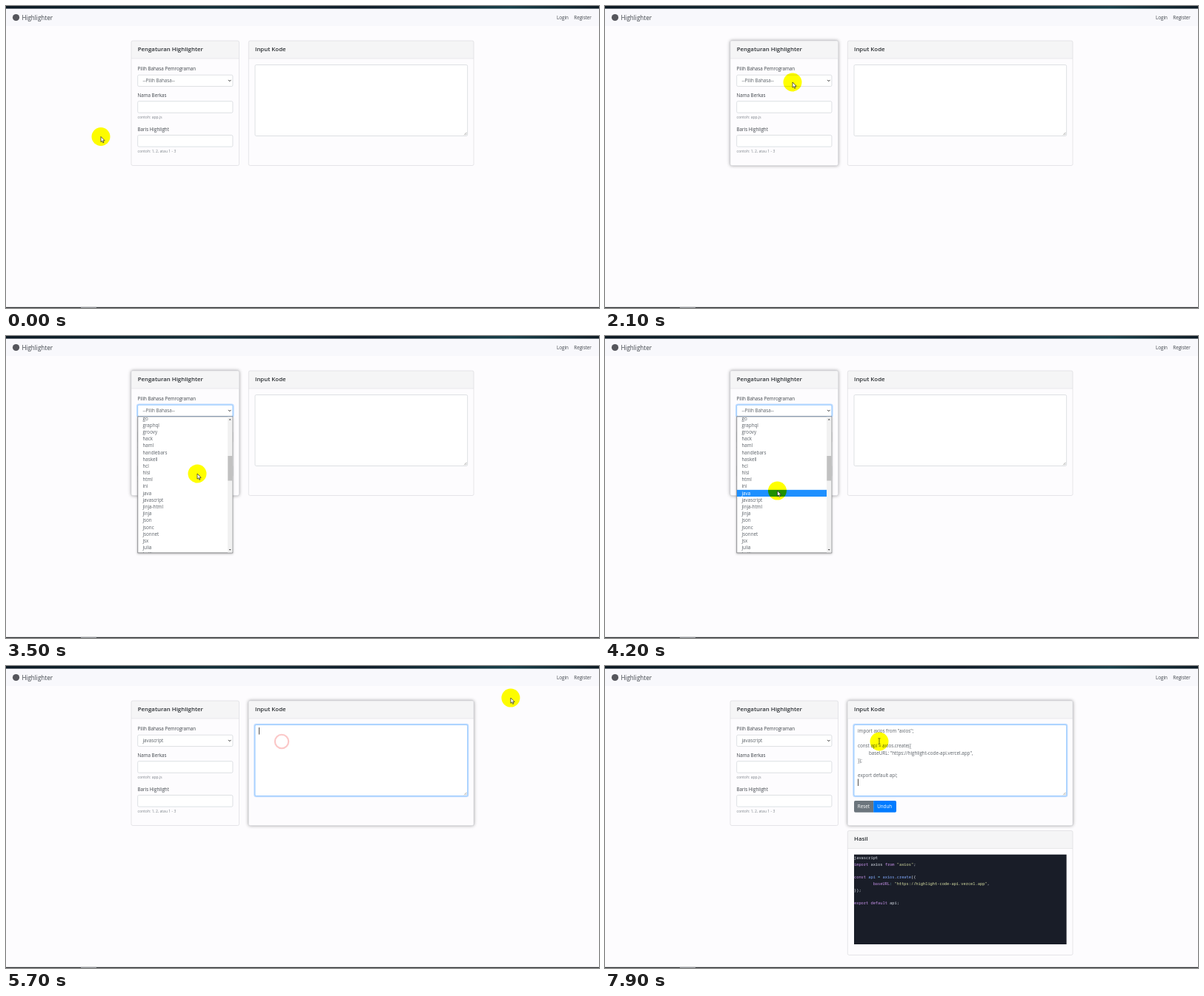
Recreate the animation shown at these times as an HTML page. Size 800 by 408 pixels, loop 8 s.

```html
<!DOCTYPE html>
<html lang="id">
<head>
<meta charset="utf-8">
<title>Highlighter</title>
<style>
  html, body { margin: 0; width: 100%; height: 100%; overflow: hidden; background: #fdfcfe; }
  svg { display: block; width: 100vw; height: 100vh; }
  text { font-family: "Open Sans", "Noto Sans", sans-serif; font-size: 6.25px; fill: #3f444a; white-space: pre; }
  .title { font-size: 7.85px; font-weight: 600; fill: #2b2f33; }
  .brand { font-size: 8.1px; }
  .hint { font-size: 5.05px; fill: #7c838a; }
  .field, .option { fill: #5a6067; }
  .button { fill: #fff; }
  .code { font-family: "Noto Sans Mono", "DejaVu Sans Mono", monospace; font-size: 5.35px; }
  .shadow { fill: #fff; stroke: #c4c4c8; filter: drop-shadow(0 0 2px rgba(0, 0, 0, .35)); }
  .glow { fill: none; stroke: #bfdcff; stroke-width: 2.6; }
  .halo { fill: #ff0; mix-blend-mode: multiply; }
</style>
</head>
<body>
<svg id="stage" viewBox="0 0 800 408"></svg>
<script>
const LOOP = 8000, STEP = 100;
const ROW = 9.18, LIST_TOP = 109, LIST_H = 184, SCROLL = 250;
const LANGS = ("--Pilih Bahasa-- abap actionscript-3 ada apex asm awk bat c clojure cobol coffee cpp " +
  "crystal csharp css d dart diff dockerfile dream-maker elixir elm erb erlang fish fsharp go graphql " +
  "groovy hack haml handlebars haskell hcl hlsl html ini java javascript jinja-html jinja json jsonc " +
  "jsonnet jsx julia kotlin").replace("--Pilih ", "--Pilih_").split(" ").map(s => s.replace("_", " "));

// Pointer stops: time, x, y
const PATH = [
  [0, 128, 176.5], [1400, 128, 176.5], [2100, 253, 103], [2400, 253, 103], [2800, 255, 142],
  [3100, 258, 186], [3500, 258, 186], [3900, 235, 207], [4100, 235, 207], [4500, 219, 220.5],
  [4700, 219, 220.5], [4900, 325, 168.5], [5000, 332, 160], [5300, 372, 102], [5500, 372, 102],
  [5800, 789, 22.5], [5900, 789, 22.5], [6300, 370, 102], [LOOP, 370, 102]
];
const CLICKS = [[1400, 128, 176.5], [2250, 253, 103], [4690, 219, 220.5], [5350, 372, 102]];

const rect = (x, y, w, h, fill, more = "") =>
  `<rect x="${x}" y="${y}" width="${w}" height="${h}" fill="${fill}" ${more}/>`;
const text = (x, y, str, cls = "", more = "") => `<text x="${x}" y="${y}" class="${cls}" ${more}>${str}</text>`;
const box = (x, y, w, h, id = "") =>
  rect(x, y, w, h, "#fff", `rx="1.7" stroke="#d0d4d9" stroke-width=".7" ${id && `id="${id}"`}`);
const glow = (id, x, y, w, h) => `<rect id="${id}" class="glow" x="${x}" y="${y}" width="${w}" height="${h}" rx="2"/>`;

function card(x, y, w, h, title, shadowId) {
  const r = 2, top = 24;
  return (shadowId ? `<rect id="${shadowId}" class="shadow" x="${x}" y="${y}" width="${w}" height="${h}" rx="${r}"/>` : "") +
    rect(x, y, w, h, "#fdfcfe", `rx="${r}"`) +
    `<path d="M${x} ${y + top}V${y + r}q0-${r} ${r}-${r}H${x + w - r}q${r} 0 ${r} ${r}V${y + top}z" fill="#f5f5f6"/>` +
    `<path d="M${x} ${y + top}h${w}" stroke="#dedee1" stroke-width=".6"/>` +
    rect(x, y, w, h, "none", `rx="${r}" stroke="#dcdce0" stroke-width=".7"`) +
    text(x + 8.7, y + 13.6, title, "title");
}

const codeLine = (y, parts) => text(336, y, parts.map(([color, s]) => `<tspan fill="${color}">${s}</tspan>`).join(""), "code");
const PURPLE = "#c792ea", PLAIN = "#dfe4ee", STRING = "#d9e0a3", BLUE = "#82aaff", CYAN = "#89ddff";
const URL_TEXT = '"https://highlight-code-api.vercel.app"';

const pasted = [
  [341, 89.8, 'import axios from "axios";'], [341, 109.8, "const api = axios.create({"],
  [356, 119.8, `baseURL: ${URL_TEXT},`], [341, 129.8, "});"], [341, 149.8, "export default api;"]
];
const result = [
  [261, [[PLAIN, "javascript"]]],
  [269.8, [[PURPLE, "import"], [PLAIN, " axios "], [PURPLE, "from "], [STRING, '"axios"'], [PLAIN, ";"]]],
  [287.3, [[PURPLE, "const "], [BLUE, "api "], [CYAN, "= "], [BLUE, "axios"], [PLAIN, "."], [BLUE, "create"], [PLAIN, "({"]]],
  [296.1, [[PURPLE, "        baseURL"], [CYAN, ": "], [STRING, URL_TEXT], [PLAIN, ","]]],
  [304.8, [[PLAIN, "});"]]],
  [322.3, [[PURPLE, "export default "], [PLAIN, "api;"]]]
];

const stage = document.getElementById("stage");
stage.innerHTML =
  `<defs><clipPath id="listClip">${rect(178, LIST_TOP, 121, LIST_H, "#000")}</clipPath>
   <linearGradient id="sky"><stop stop-color="#0d1a24"/><stop offset=".35" stop-color="#12303a"/>
   <stop offset=".6" stop-color="#0f1d2a"/><stop offset=".85" stop-color="#17404a"/><stop offset="1" stop-color="#0e1c26"/></linearGradient></defs>` +
  rect(0, 0, 800, 408, "#fdfcfe") + rect(0, 3, 800, 24, "#f8f8fc") + rect(0, 0, 800, 3.6, "url(#sky)") +
  rect(0, 406.8, 800, 1.2, "#2a2d31") + rect(101, 406.8, 21, 1.2, "#8b8e92") +
  `<circle cx="13.5" cy="15.5" r="4.6" fill="#55565c"/>` +
  text(21.4, 18.8, "Highlighter", "brand") + text(743, 18, "Login") + text(766.3, 18, "Register") +
  card(169, 47, 145.5, 168.5, "Pengaturan Highlighter", "shadow1") +
  card(327.3, 47, 303.7, 168.5, "Input Kode", "shadow2") +
  text(177.5, 87.2, "Pilih Bahasa Pemrograman") + text(177.5, 122.8, "Nama Berkas") + text(177.5, 168.8, "Baris Highlight") +
  text(177.5, 152, "contoh: app.js", "hint") + text(177.5, 198, "contoh: 1, 2, atau 1 - 3", "hint") +
  glow("selectGlow", 177.3, 92.7, 129, 16.4) + box(177.7, 93.2, 128.2, 15.4, "select") +
  text(184.5, 103.4, "", "field", 'id="choice"') +
  `<path d="M300.1 99.9l1.7 1.8 1.7-1.8" fill="none" stroke="#333" stroke-width="1"/>` +
  box(177.7, 128.7, 128.2, 15.6) + box(177.7, 174.5, 128.2, 15.6) +
  glow("areaGlow", 335.6, 79.1, 287.4, 96.8) + box(336, 79.5, 286.6, 96, "area") +
  `<path d="M618 174.3l3.6-3.6M620 174.3l1.6-1.6" stroke="#777" stroke-width=".6"/>` +
  `<g id="pasted">${pasted.map(p => text(...p, "field")).join("")}</g>` +
  rect(341, 83, .8, 9.5, "#222", 'id="caret"') +
  `<g id="result">` +
    `<path d="M362.2 182h-24.4q-1.8 0-1.8 1.8v12.2q0 1.8 1.8 1.8h24.4z" fill="#6c757d"/>` +
    `<path d="M362.2 182h29q1.8 0 1.8 1.8v12.2q0 1.8-1.8 1.8h-29z" fill="#007bff"/>` +
    text(340.8, 192.2, "Reset", "button") + text(367.2, 192.2, "Unduh", "button") +
    card(327.3, 222.5, 303.7, 168, "Hasil") + rect(336, 254.7, 286.6, 121.3, "#191d28") +
    `<g id="code">${result.map(l => codeLine(...l)).join("")}</g></g>` +
  `<g id="list">` +
    rect(177.8, 108.9, 128, 184, "#fff", 'stroke="#77797c" stroke-width=".8" style="filter:drop-shadow(0 1px 1.5px rgba(0,0,0,.3))"') +
    `<g clip-path="url(#listClip)"><g id="rows">` + rect(178, 0, 121, ROW, "#1e90ff", 'id="mark"') +
    LANGS.map((s, i) => text(184.5, 115.8 + i * ROW, s, "option", i ? "" : 'opacity=".7"')).join("") + `</g></g>` +
    rect(299, 109.3, 6.4, 183.2, "#f1f1f1") + rect(299.3, 116, 5.8, 33.5, "#c1c1c1", 'id="thumb"') +
    `<path d="M300.7 113.6l1.5-1.8 1.5 1.8zM300.7 288l1.5 1.8 1.5-1.8z" fill="#505050"/></g>` +
  `<circle id="halo" class="halo" r="12.5"/>` +
  CLICKS.map(() => `<circle class="ring" fill="none" stroke="#f02020"/>`).join("") +
  `<path id="arrow" d="M0 0v7.2l1.7-1.5 1.1 2.6 1.2-.5-1.1-2.5h2.3z" fill="#fff" stroke="#111" stroke-width=".65"/>` +
  `<path id="beam" d="M-1.5-4.2h1.1l.4.4.4-.4h1.1M0-3.8v7M-1.5 3.6h1.1l.4-.4.4.4h1.1" fill="none" stroke="#222" stroke-width=".7"/>`;

const $ = id => document.getElementById(id);
const set = (el, attrs) => { for (const k in attrs) el.setAttribute(k, attrs[k]); };
const show = (id, on) => set($(id), { visibility: on ? "visible" : "hidden" });
const ramp = (t, a, b) => Math.min(1, Math.max(0, (t - a) / (b - a)));
const ease = p => p * p * (3 - 2 * p);
const within = (t, a, b) => t >= a && t < b;
const rings = stage.querySelectorAll(".ring");
const options = stage.querySelectorAll(".option");

function pointer(t) {
  const i = PATH.findIndex(p => p[0] > t);
  const [t0, x0, y0] = PATH[i - 1], [t1, x1, y1] = PATH[i];
  const p = ease(ramp(t, t0, t1));
  return [x0 + (x1 - x0) * p, y0 + (y1 - y0) * p];
}

function drawRing(el, t, [start, x, y]) {
  const age = t - start, p = ramp(age, 0, 450);
  set(el, {
    cx: x, cy: y, r: 1.8 + 9.5 * p, "stroke-width": 2.9 - p,
    opacity: within(age, 0, 450) ? .95 - .9 * p : 0
  });
}

function drawList(t, y) {
  const open = within(t, 2300, 4700);
  show("list", open);
  const scroll = SCROLL * ease(ramp(t, 3100, 3500));
  // The marked row only follows the pointer while it moves
  const at = within(t, 3100, 3600) ? 186 - LIST_TOP : y - LIST_TOP + scroll;
  const row = open && at >= ROW ? Math.floor(at / ROW) : -1;
  set($("rows"), { transform: `translate(0 ${-scroll})` });
  set($("mark"), { y: LIST_TOP + row * ROW, opacity: row > 0 ? 1 : 0 });
  set($("thumb"), { y: 116 + 46 * scroll / SCROLL });
  options.forEach((o, i) => { o.style.fill = i === row ? "#fff" : ""; });
}

function focusBox(name, on) {
  show(name + "Glow", on);
  set($(name), { stroke: on ? "#80bdff" : "#d0d4d9" });
}

function caretOn(t) {
  return within(t, 5400, 6000) || within(t, 6500, 7400) || t >= 7900;
}

function draw(t) {
  const [x, y] = pointer(t);
  const place = { transform: `translate(${x} ${y})` };
  const inArea = x > 336 && x < 622 && y > 80 && y < 175;
  ["halo", "arrow", "beam"].forEach(id => set($(id), place));
  show("arrow", !inArea);
  show("beam", inArea);
  CLICKS.forEach((c, i) => drawRing(rings[i], t, c));

  set($("shadow1"), { opacity: ramp(t, 1700, 1900) - ramp(t, 4950, 5150) });
  set($("shadow2"), { opacity: ramp(t, 4950, 5150) });
  focusBox("select", within(t, 2300, 5400));
  focusBox("area", t >= 5400);
  $("choice").textContent = t < 4700 ? LANGS[0] : "javascript";
  drawList(t, y);

  show("pasted", t >= 6800);
  show("caret", caretOn(t));
  set($("caret"), { y: t < 6800 ? 83 : 152.5 });
  show("result", t >= 7600);
  set($("code"), { opacity: t >= 7700 ? 1 : 0 });
}

function tick() {
  const t = performance.now() % LOOP;
  draw(Math.floor(t / STEP) * STEP);
  requestAnimationFrame(tick);
}
tick();
</script>
</body>
</html>
```
